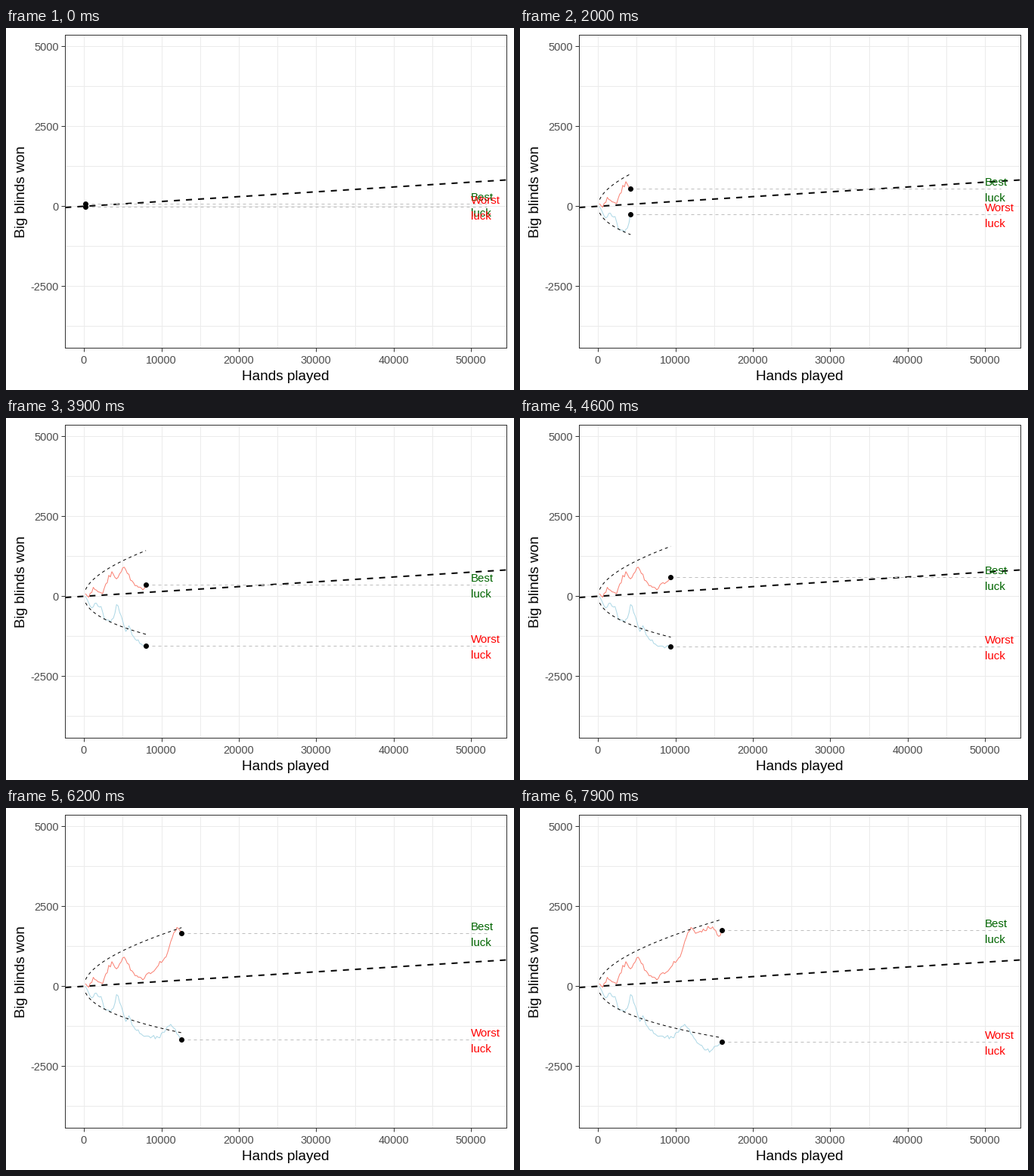
These frames come from a looping animation (672x480 px, 8000 ms). A matplotlib script:

```python
import numpy as np
import matplotlib.pyplot as plt
from matplotlib.animation import FuncAnimation

W, H, DPI = 672, 480, 96
PX = 72 / DPI                                    # points per pixel
LEFT, RIGHT, TOP, BOTTOM = 78.4, 662.4, 9.4, 424.4
X0, Y0, SX, SY = 103.2, 236.4, 0.01024, 0.0424   # zero point, pixels per unit
STEP, FRAMES = 200, 80
WIN_RATE, SPREAD = 0.0151, 14.64
DASHED = (0, (4, 4))

steps = np.arange(1, FRAMES + 1)
hands = STEP * steps
mean, margin = WIN_RATE * hands, SPREAD * np.sqrt(hands)


def walk(seed, *turns):
    """Totals running through the (step, value) turns, with noise between."""
    at, value = zip(*turns)
    noise = np.random.default_rng(seed).normal(0, 35, FRAMES)
    return np.interp(steps, at, value) + np.where(np.isin(steps, at), 0, noise)


best = walk(4, (1, 75), (3, -30), (6, 280), (9, 141), (12, 80), (14, 380),
            (18, 770), (21, 545), (26, 910), (33, 330), (38, 200), (40, 354),
            (44, 440), (53, 920), (57, 1520), (60, 1840), (63, 1655),
            (74, 1860), (78, 1560), (80, 1745))
worst = walk(7, (1, -20), (5, -365), (7, -220), (9, -307), (11, -320),
             (13, -680), (17, -800), (20, -520), (21, -260), (22, -300),
             (27, -1100), (29, -920), (32, -1260), (38, -1540), (49, -1610),
             (53, -1320), (56, -1190), (63, -1675), (68, -1930), (73, -2010),
             (80, -1745))

plt.rcParams["font.family"] = "Liberation Sans"
fig = plt.figure(figsize=(W / DPI, H / DPI), dpi=DPI, facecolor="white")
ax = fig.add_axes([LEFT / W, 1 - BOTTOM / H,
                   (RIGHT - LEFT) / W, (BOTTOM - TOP) / H])
xlim = ((LEFT - X0) / SX, (RIGHT - X0) / SX)
ax.set(xlim=xlim, ylim=((Y0 - BOTTOM) / SY, (Y0 - TOP) / SY))


def put(x, y, text, size, color, ha="center", rotation=0):
    fig.text(x / W, 1 - y / H, text, fontsize=size * PX, color=color, ha=ha,
             va="baseline", rotation=rotation, rotation_mode="anchor")


def line(color, width=1, style="-", z=3, data=((), ())):
    return ax.plot(*data, color=color, lw=width * PX, ls=style, zorder=z)[0]


# Panel, grid and axes
xticks, yticks = range(0, 50001, 10000), range(-2500, 5001, 2500)
ax.set_xticks(xticks, labels=[])
ax.set_yticks(yticks, labels=[])
ax.tick_params(length=5 * PX, width=PX, color="#333333")
for spine in ax.spines.values():
    spine.set(color="#333333", linewidth=PX, zorder=20)
for x in range(0, 50001, 5000):
    ax.axvline(x, color="#EBEBEB", lw=PX, zorder=0)
for y in range(-3750, 5001, 1250):
    ax.axhline(y, color="#EBEBEB", lw=PX, zorder=0)
for x in xticks:
    put(X0 + SX * x - 0.4, 445, str(x), 14.5, "#4D4D4D")
for y in yticks:
    put(69.5, Y0 - SY * y + 5.6, str(y), 14.5, "#4D4D4D", ha="right")
put((LEFT + RIGHT) / 2 - 0.5, 467, "Hands played", 19, "black")
put(25, (TOP + BOTTOM) / 2, "Big blinds won", 19, "black", rotation=90)

# Expected winnings and the band around them
line("black", 2, DASHED, 2, (xlim, [WIN_RATE * x for x in xlim]))
bands = [(line("black", 1, DASHED, 5), mean + margin),
         (line("black", 1, DASHED, 5), mean - margin)]


class Run:
    """One player's path with its dot, guide line and label."""

    def __init__(self, values, name, path_color, text_color):
        self.values = values
        self.path = line(path_color, z=4)
        self.guide = line("#BEBEBE", style=DASHED, z=3)
        self.dot, = ax.plot([], [], "o", color="black", ms=7 * PX, mew=0,
                            zorder=6)
        self.words = [
            ax.annotate(word, (50000, 0), xytext=(0, dy * PX),
                        textcoords="offset points", fontsize=15 * PX,
                        color=text_color, ha="left", va="baseline", zorder=8)
            for word, dy in ((name, 4), ("luck", -17))]

    def show(self, n):
        x, y = hands[n - 1], self.values[n - 1]
        self.path.set_data(hands[:n], self.values[:n])
        self.guide.set_data([x, 52000], [y, y])
        self.dot.set_data([x], [y])
        for word in self.words:
            word.xy = (50000, y)


runs = [Run(best, "Best", "salmon", "darkgreen"),
        Run(worst, "Worst", "lightblue", "red")]


def update(i):
    n = i + 1
    for band, values in bands:
        band.set_data(hands[:n], values[:n])
    for run in runs:
        run.show(n)


anim = FuncAnimation(fig, update, frames=FRAMES, interval=100,
                     init_func=lambda: None, repeat=True, repeat_delay=0,
                     blit=False)
plt.show()
```
